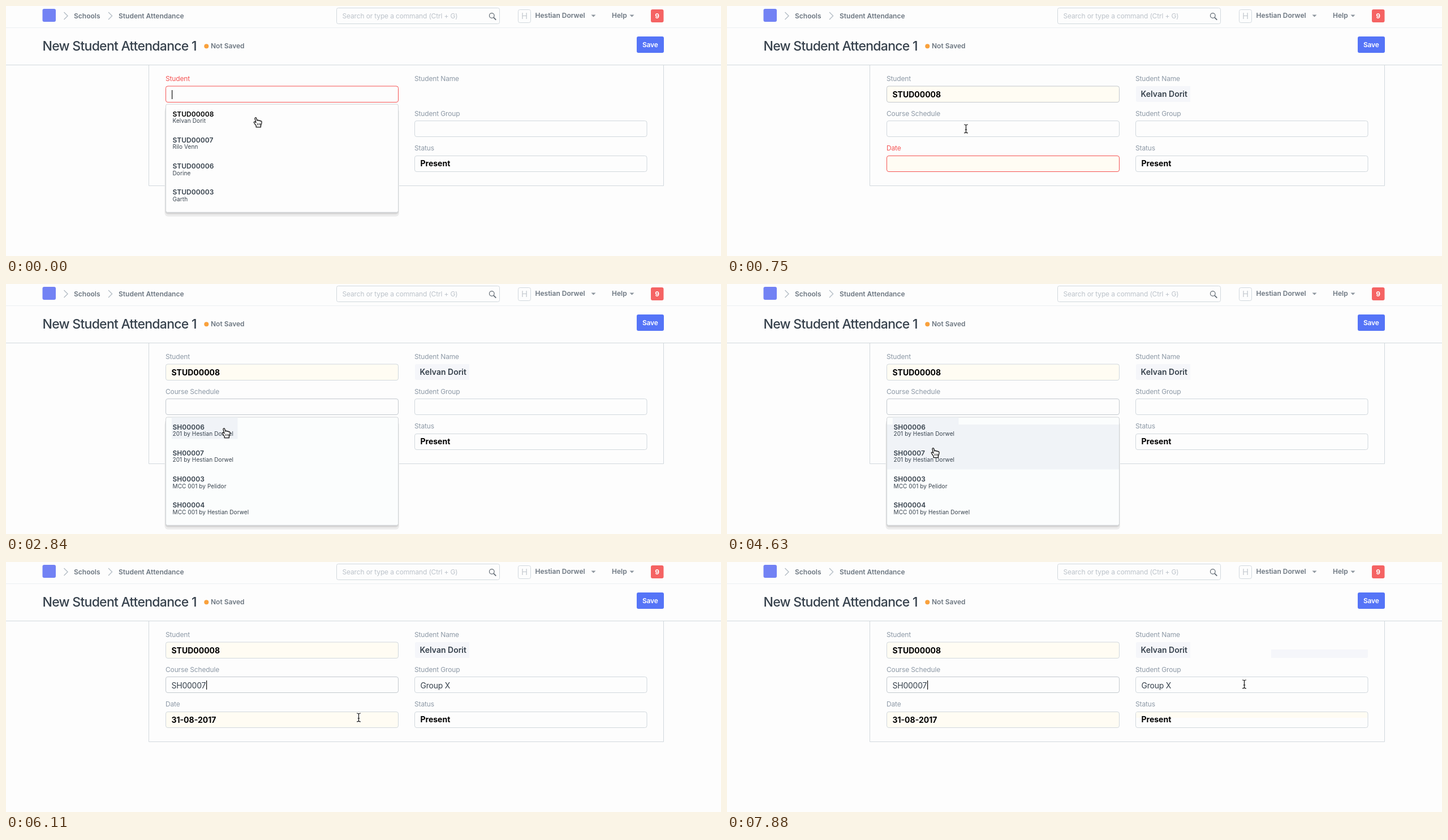
Animation, 1264 px wide and 443 px high, one loop 8 s. Source, as an HTML page:

```html
<!DOCTYPE html>
<html lang="en">
<head>
<meta charset="utf-8">
<title>Student Attendance</title>
<style>
html, body { margin: 0; width: 100%; height: 100%; overflow: hidden; background: #fdfdfd; }
svg { display: block; width: 1264px; height: 443px; }
text { font: 400 12px Inter, Roboto, sans-serif; fill: #8d99a6; letter-spacing: -.15px; white-space: pre; }
.nav { font-weight: 600; fill: #6c7680; letter-spacing: 0; }
.title { font-size: 23px; font-weight: 500; fill: #36414c; letter-spacing: -.73px; }
.value { font-size: 14px; fill: #36414c; letter-spacing: -.25px; }
.strong { font-size: 14px; font-weight: 700; fill: #000; letter-spacing: 0; }
.name { font-size: 14px; font-weight: 600; fill: #36414c; letter-spacing: 0; }
.item { font-weight: 600; fill: #36414c; letter-spacing: .05px; }
.sub { font-size: 10px; fill: #36414c; letter-spacing: .1px; }
.field { fill: #fdfdfd; stroke: #d1d8dd; }
.line { fill: none; stroke: #d1d8dd; }
.tint { fill: #fffcf3; }
</style>
</head>
<body>
<svg id="stage" viewBox="0 0 1264 443">
  <rect width="1264" height="443" fill="#fdfdfd"/>
  <path d="M0 38.5H1264" stroke="#ebeff2"/>
  <rect x="64.5" y="5" width="23.5" height="23" rx="3" fill="#7282f4"/>
  <path d="M102.5 11l6.5 6.5-6.5 6.5M181 11l6.5 6.5-6.5 6.5" fill="none" stroke="#b4bdc5" stroke-width="1.4"/>
  <text class="nav" x="120" y="22">Schools</text>
  <text class="nav" x="199" y="22">Student Attendance</text>
  <rect class="field" x="584.5" y="3.5" width="288" height="28" rx="3"/>
  <text x="594.5" y="22" style="fill:#bcc3ca">Search or type a command (Ctrl + G)</text>
  <g fill="none" stroke="#626b74"><circle cx="858.8" cy="17" r="4.3" stroke-width="1.2"/><path d="M862 20.3l4.3 4.3" stroke-width="1.8"/></g>
  <rect class="field" x="905.5" y="6.5" width="22" height="23" rx="3"/>
  <text x="916.5" y="23" text-anchor="middle" style="font-size:15px;fill:#c5cbd1">H</text>
  <text class="nav" x="935.5" y="21">Hestian Dorwel</text>
  <path d="M1034.5 15.5h8l-4 4zM1102.5 15.5h8l-4 4z" fill="#8d969e"/>
  <text class="nav" x="1071" y="21">Help</text>
  <rect x="1140" y="6" width="22.5" height="23" rx="3" fill="#f56363"/>
  <text x="1151.2" y="22" text-anchor="middle" style="font-weight:700;fill:#fff">9</text>

  <text class="title" x="64.5" y="79">New Student Attendance 1</text>
  <circle cx="354.3" cy="71.3" r="4" fill="#f9a13c"/>
  <text class="nav" x="362" y="75">Not Saved</text>
  <rect x="1115" y="54" width="48" height="29" rx="3" fill="#5574f7"/>
  <text x="1138.8" y="73" text-anchor="middle" style="font-weight:600;fill:#fff">Save</text>

  <path class="line" d="M252.5 104.5V318.5H1162.5V104.5M0 104.5H1264"/>
  <text id="studentLabel" x="282" y="133">Student</text>
  <rect id="studentBox" class="field" x="282.5" y="142" width="411" height="28.5" rx="3.5"/>
  <text id="student" class="strong" x="292.5" y="162">STUD00008</text>
  <text x="282" y="194.5">Course Schedule</text>
  <rect id="courseBox" class="field" x="282.5" y="203.5" width="411" height="28" rx="3.5"/>
  <text id="course" class="value" x="292.5" y="223.5">SH00007</text>
  <text id="dateLabel" x="282" y="256">Date</text>
  <rect id="dateBox" class="field" x="282.5" y="265.5" width="411" height="28" rx="3.5" style="fill:#fffcf3"/>
  <text id="date" class="strong" x="292.5" y="285">31-08-2017</text>

  <text x="722" y="133">Student Name</text>
  <g id="fullName">
    <path d="M819 142V170H726q-3 0-3-3V145q0-3 3-3z" fill="#f5f6fa"/>
    <text class="name" x="731.5" y="161">Kelvan Dorit</text>
  </g>
  <path id="nameStrip" d="M962 155H1133V167q0 3-3 3H962z" fill="#f5f6fa"/>
  <text x="722" y="194.5">Student Group</text>
  <rect class="field" x="722.5" y="203.5" width="410.5" height="28" rx="3.5"/>
  <text id="group" class="value" x="732.5" y="223.5">Group X</text>
  <text x="722" y="256">Status</text>
  <rect class="field" x="722.5" y="265.5" width="410.5" height="28" rx="3.5"/>
  <path id="statusTint" class="tint" d="M723 276V269q0-3 3-3H1129q3 0 3 3V276z"/>
  <text class="strong" x="732.5" y="284">Present</text>

  <g id="studentMenu"></g>
  <g id="courseMenu"></g>
  <rect id="caret" width="1.2" height="16" fill="#111"/>
  <g id="beam" fill="none">
    <path d="M-3.5-7.5q3 0 3.5 1.5q.5-1.5 3.5-1.5M0-6.5V6.5M-3.5 7.5q3 0 3.5-1.5q.5 1.5 3.5 1.5M-1.8 1.5h3.6" stroke="#fff" stroke-width="2.6"/>
    <path d="M-3.5-7.5q3 0 3.5 1.5q.5-1.5 3.5-1.5M0-6.5V6.5M-3.5 7.5q3 0 3.5-1.5q.5 1.5 3.5 1.5M-1.8 1.5h3.6" stroke="#111" stroke-width="1.2"/>
  </g>
  <g id="hand">
    <path d="M-2.6 8V5.6C-3.6 3.8-6.6 1.2-6.2-.2C-5.6-1.5-4-.7-2.8.8L-4.6-5.8C-5-7.8-2.8-8.4-2.1-6.5L-.9-2.6C-.5-3.9 1.4-3.8 1.8-2.3C2.3-3.4 4-3.1 4.3-1.7C5-2.6 6.4-2 6.5-.6C6.7 2.4 5.6 4 5 5.6V8z" fill="#fff" stroke="#111" stroke-width="1.2" stroke-linejoin="round"/>
    <path d="M-.4 1.6V5M2 1.6V5M4.2 1.6V5" stroke="#111" stroke-width=".9"/>
  </g>
</svg>
<script>
const LOOP = 8000;
const $ = id => document.getElementById(id);
const show = (id, on) => $(id).setAttribute('visibility', on ? 'inherit' : 'hidden');

function menu(id, top, fill, rows) {
  const items = rows.map(([code, info], i) => {
    const y = top + 22 + i * 46.2;
    return `<text class="item" x="294.5" y="${y}">${code}</text><text class="sub" x="294.5" y="${y + 11.7}">${info}</text>`;
  }).join('');
  $(id).innerHTML = `
    <rect x="280.5" y="${top + 8}" width="414.5" height="191.5" rx="6" fill="#ececec"/>
    <rect x="281.5" y="${top + 4}" width="412.5" height="191.5" rx="5" fill="#d6d6d6"/>
    <rect x="282.5" y="${top + .5}" width="411" height="191.5" rx="3" fill="${fill}" stroke="#d1d5d8"/>
    <path class="hoverTop" d="M293 ${top + 1}H409.5V${top + 39}H293z" fill="#f0f3f7" visibility="hidden"/>
    <path class="hoverRow" d="M283 ${top + 13.5}H693V${top + 93}H283z" fill="#f0f3f7" visibility="hidden"/>
    ${items}`;
}

menu('studentMenu', 173.5, '#fdfdfd', [
  ['STUD00008', 'Kelvan Dorit'], ['STUD00007', 'Rilo Venn'],
  ['STUD00006', 'Dorine'], ['STUD00003', 'Garth']
]);
menu('courseMenu', 235.5, '#fbfdfd', [
  ['SH00006', '201 by Hestian Dorwel'], ['SH00007', '201 by Hestian Dorwel'],
  ['SH00003', 'MCC 001 by Pelidor'], ['SH00004', 'MCC 001 by Hestian Dorwel']
]);
$('studentMenu').querySelector('.item').style.fill = '#000';
const hoverTop = document.querySelector('#courseMenu .hoverTop');
const hoverRow = document.querySelector('#courseMenu .hoverRow');

// time, pointer, x, y
const moves = [
  [0, 'hand', 445, 206], [300, 'beam', 443, 207], [450, 'beam', 436, 212],
  [600, 'beam', 426, 217], [750, 'beam', 422.5, 217.5], [900, 'beam', 414, 223],
  [1050, 'beam', 408, 227], [1650, 'beam', 406, 229],
  [2540, 'hand', 392, 262], [2690, 'hand', 390, 264], [2840, 'hand', 389, 264],
  [4190, 'hand', 387, 258], [4340, 'hand', 374, 288], [4490, 'hand', 369, 297],
  [4630, 'hand', 368, 299], [5230, 'beam', 382, 291], [5380, 'beam', 440, 284],
  [5520, 'beam', 520, 280], [5670, 'beam', 574, 278], [5960, 'beam', 612, 277],
  [6110, 'beam', 623.5, 275.5], [6410, 'beam', 860, 275], [6560, 'beam', 1166, 268],
  [6850, 'beam', 1166, 240], [7000, 'beam', 1160, 200], [7150, 'beam', 1144, 172],
  [7300, 'beam', 967, 164], [7440, 'beam', 942, 184], [7590, 'beam', 926, 203],
  [7740, 'beam', 917, 213], [7880, 'beam', 914.5, 216.5]
];

// time, x, y; no position hides the caret
const blinks = [
  [0, 293, 149], [150], [300, 378, 149], [750], [1050, 378, 149],
  [1200, 293, 210], [1650], [2090, 293, 210], [2540], [3140, 293, 210],
  [3590], [4190, 293, 210], [4630], [5080, 354, 210], [5520],
  [6110, 354, 210], [6560], [7000, 354, 210], [7440], [7880, 354, 210]
];

const at = (steps, t) => steps.filter(s => s[0] <= t).pop();

function draw(t) {
  const picked = t >= 300, dated = t >= 5080;
  const [, kind, x, y] = at(moves, t);
  for (const id of ['hand', 'beam']) show(id, id === kind);
  $(kind).setAttribute('transform', `translate(${x} ${y}) scale(${kind === 'hand' ? 1.08 : 1})`);

  const [, cx, cy] = at(blinks, t);
  show('caret', cx !== undefined);
  if (cx !== undefined) {
    $('caret').setAttribute('x', cx);
    $('caret').setAttribute('y', cy);
  }

  show('studentMenu', !picked);
  show('student', picked);
  $('studentLabel').style.fill = picked ? '' : '#f55353';
  $('studentBox').style.stroke = picked ? (t < 1200 ? '#c3c8cc' : '') : '#f55353';
  $('studentBox').style.fill = picked ? '#fffcf3' : '';
  show('fullName', t >= 450);

  show('courseMenu', t >= 1650 && t < 4930);
  hoverTop.setAttribute('visibility', t >= 2540 ? 'inherit' : 'hidden');
  hoverRow.setAttribute('visibility', t >= 4340 ? 'inherit' : 'hidden');
  $('courseBox').style.stroke = t >= 1200 ? '#c3c9ce' : '';
  show('course', t >= 4930);

  $('dateLabel').style.fill = dated ? '' : '#f55353';
  $('dateBox').style.stroke = dated ? '' : '#f55353';
  show('date', dated);
  show('group', dated);
  show('statusTint', t >= 6560);
  show('nameStrip', t >= 7300);
}

function tick() {
  draw(performance.now() % LOOP);
  requestAnimationFrame(tick);
}
tick();
</script>
</body>
</html>
```
